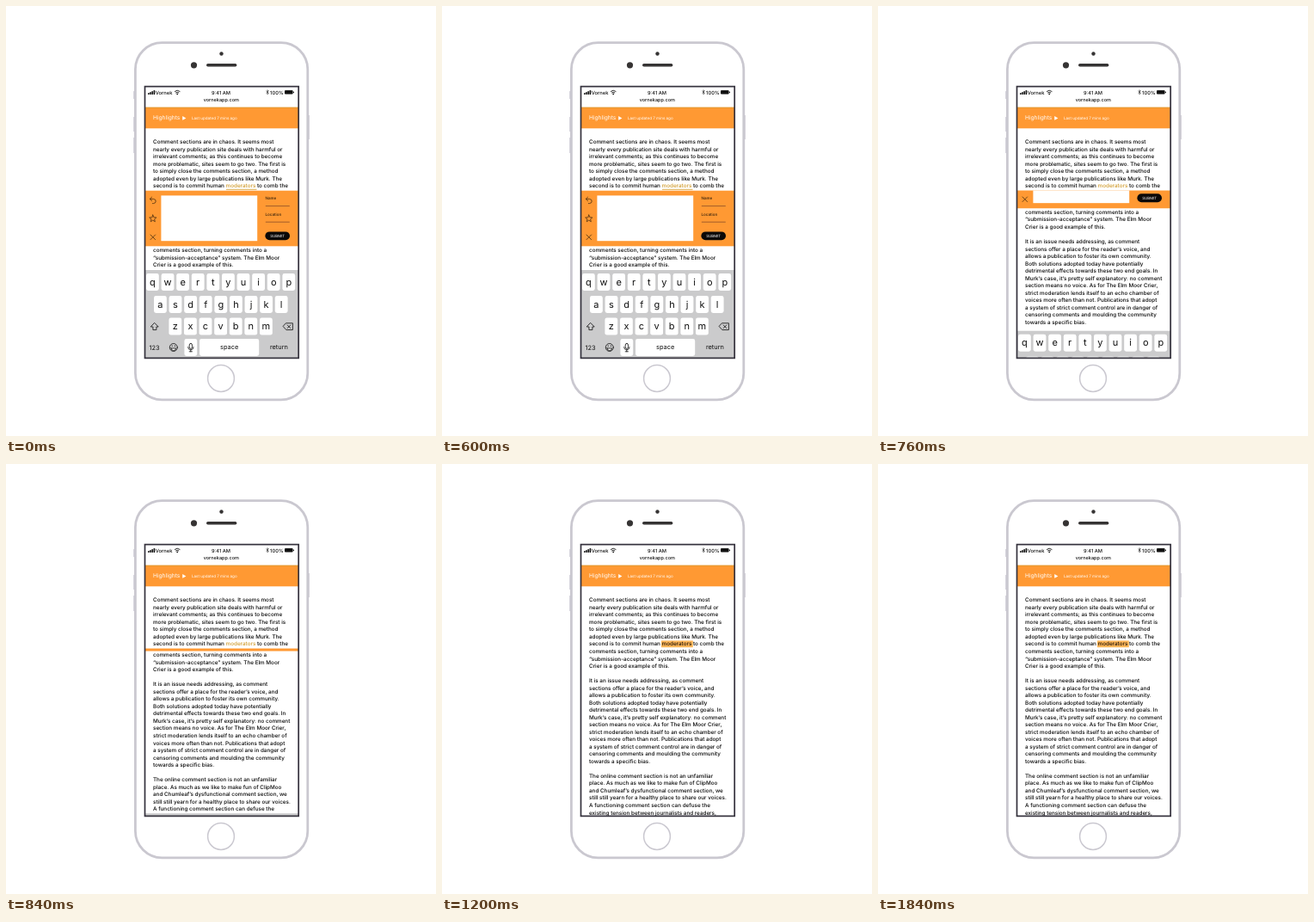
An HTML page that plays this animation: 500 by 500 pixels, repeating every 1880 ms.

```html
<!DOCTYPE html>
<html lang="en">
<head>
<meta charset="utf-8">
<title>Comment panel closing</title>
<style>
  html, body { margin: 0; width: 100%; height: 100%; overflow: hidden; background: #fff; }
  svg { display: block; width: 100vw; height: 100vh; }
  text { font-family: Inter, "Liberation Sans", sans-serif; text-rendering: geometricPrecision; white-space: pre; }
  .line { fill: none; stroke-linecap: round; stroke-linejoin: round; }
  .copy { font-size: 6.32px; font-weight: 500; fill: #080808; }
</style>
</head>
<body>
<svg id="stage" viewBox="0 0 500 500" xmlns="http://www.w3.org/2000/svg">
  <defs>
    <clipPath id="screenClip"><rect x="162" y="94" width="178" height="315"/></clipPath>
    <clipPath id="lowerClip"><rect x="162" y="214.6" width="178" height="194.4"/></clipPath>
  </defs>
  <rect width="500" height="500" fill="#fff"/>

  <!-- phone body -->
  <path d="M148.8 99v9M148.8 129v17M148.8 153v18M352.2 127v28" stroke="#d3d1da" stroke-width="1.4"/>
  <rect x="150.4" y="42.6" width="200.4" height="415.2" rx="31" fill="#fff" stroke="#cac8d0" stroke-width="2.8"/>
  <g fill="#363434">
    <circle cx="218.5" cy="68.8" r="3.6"/>
    <circle cx="250.5" cy="55.5" r="2.2"/>
    <rect x="233" y="67.1" width="35.4" height="3.5" rx="1.75"/>
  </g>
  <circle cx="250" cy="433" r="15.4" fill="#fff" stroke="#cac8d0" stroke-width="1.5"/>

  <g clip-path="url(#screenClip)">
    <!-- status bar -->
    <g fill="#111" font-weight="500">
      <g id="signal"></g>
      <text x="173.7" y="102.8" font-size="5.8">Vornek</text>
      <text x="250" y="102.8" font-size="5.7" text-anchor="middle">9:41 AM</text>
      <text x="250.3" y="111.3" font-size="5.5" text-anchor="middle">vornekapp.com</text>
      <text x="307" y="102.8" font-size="5.8">100%</text>
      <rect x="324" y="98" width="9.6" height="4.6" rx="1"/>
      <rect x="334" y="99.4" width="1" height="1.8" rx=".4"/>
      <circle cx="199.2" cy="102.3" r=".9"/>
    </g>
    <g class="line" stroke="#111">
      <path d="M196.3 99.3q2.9-2.5 5.8 0M197.6 100.8q1.6-1.3 3.2 0" stroke-width=".9"/>
      <path d="M302.9 99l2.4 2.4-1.2 1.3v-5l1.2 1.3-2.4 2.4" stroke-width=".6"/>
    </g>

    <!-- header -->
    <rect x="162" y="117.8" width="178" height="24.5" fill="#ff9933"/>
    <path d="M162 118.2h178" stroke="#d9982c" stroke-width=".8"/>
    <g fill="#fff">
      <text x="171" y="132.3" font-size="6.65">Highlights</text>
      <path d="M205.2 128l4.2 2.4-4.2 2.4z"/>
      <text x="216" y="132" font-size="4.56">Last updated 7 mins ago</text>
    </g>

    <rect id="highlight" x="255" y="205.4" width="36.8" height="7.8" fill="#ffb759"/>
    <g id="upperText" class="copy"></g>
    <path id="underline" d="M256 213.3h35.5" stroke="#dba53c" stroke-width=".9"/>

    <g clip-path="url(#lowerClip)">
      <g id="lowerText" class="copy"></g>
      <g id="panel">
        <rect x="162" y="214.4" width="178" height="64.9" fill="#ff9933"/>
        <rect x="180.4" y="220.4" width="111.8" height="52.8" fill="#fff"/>
        <g class="line" stroke="#553512" stroke-width=".85">
          <path d="M169.6 222.2l-2.4 2.2 2.4 2.2M167.4 224.4h4q2.8.2 2.8 2.6t-2.8 2.6h-1"/>
          <path id="star"/>
          <path d="M168 266l5.6 5.6M173.6 266l-5.6 5.6"/>
        </g>
        <g font-size="4.55" font-weight="500" fill="#33210c">
          <text x="301.5" y="224.8">Name</text>
          <text x="301.5" y="243.8">Location</text>
        </g>
        <path d="M301.8 232.6h28M301.8 251.2h28" stroke="#8a4f27" stroke-width=".8"/>
        <rect x="301.4" y="262.4" width="28.6" height="9.8" rx="4.9" fill="#0b0908"/>
        <text x="315.7" y="268.9" font-size="4.4" fill="#fff" text-anchor="middle">SUBMIT</text>
      </g>
    </g>

    <g id="keyboard">
      <rect x="162" y="307" width="178" height="103" fill="#cbcbcc"/>
      <g id="keys" fill="#fff"></g>
      <g id="letters" font-size="11" fill="#111" text-anchor="middle"></g>
      <g font-size="7.4" fill="#111" text-anchor="middle">
        <text x="172.6" y="399.8">123</text>
        <text x="259.7" y="399.4">space</text>
        <text x="317.4" y="399.4">return</text>
      </g>
      <g class="line" stroke="#222" stroke-width=".9">
        <path d="M172.9 368.6l4.3 4.4h-2.3v3.6h-4v-3.6h-2.3z"/>
        <path d="M325.8 368.8h7.6v7.8h-7.6l-3.4-3.9zM327.2 371l3.6 3.6M330.8 371l-3.6 3.6"/>
        <circle cx="194.8" cy="397" r="4.5"/>
        <path d="M192 398h5.6q-.5 2.8-2.8 2.8t-2.8-2.8z" fill="#fff"/>
        <path d="M193.2 395v.6M196.4 395v.6"/>
        <rect x="213.2" y="392.4" width="3.2" height="6" rx="1.6" fill="#fff"/>
        <path d="M211.6 396.6q0 3.2 3.2 3.2t3.2-3.2M214.8 399.8v2M213.2 401.8h3.2"/>
      </g>
    </g>
  </g>
  <rect x="161.5" y="93.6" width="178.7" height="315.8" fill="none" stroke="#34313c" stroke-width="1.7"/>
</svg>

<script>
const LOOP = 1880, STEP = 40;
const CLOSE_START = 656, CLOSE_TIME = 267;
const PANEL_TRAVEL = 66, KEYBOARD_TRAVEL = 106;
const LINE = 8.525, FIRST_BASELINE = 160.3;

const upperLines = `Comment sections are in chaos. It seems most
nearly every publication site deals with harmful or
irrelevant comments; as this continues to become
more problematic, sites seem to go two. The first is
to simply close the comments section, a method
adopted even by large publications like Murk. The
second is to commit human *moderators* to comb the`.split("\n");

const lowerLines = `comments section, turning comments into a
“submission-acceptance” system. The Elm Moor
Crier is a good example of this.

It is an issue needs addressing, as comment
sections offer a place for the reader’s voice, and
allows a publication to foster its own community.
Both solutions adopted today have potentially
detrimental effects towards these two end goals. In
Murk’s case, it’s pretty self explanatory: no comment
section means no voice. As for The Elm Moor Crier,
strict moderation lends itself to an echo chamber of
voices more often than not. Publications that adopt
a system of strict comment control are in danger of
censoring comments and moulding the community
towards a specific bias.

The online comment section is not an unfamiliar
place. As much as we like to make fun of ClipMoo
and Chumleaf’s dysfunctional comment section, we
still still yearn for a healthy place to share our voices.
A functioning comment section can defuse the
existing tension between journalists and readers,`.split("\n");

const $ = id => document.getElementById(id);

function add(parent, tag, attrs, content = "") {
  const el = document.createElementNS("http://www.w3.org/2000/svg", tag);
  for (const name in attrs) el.setAttribute(name, attrs[name]);
  el.textContent = content;
  return parent.appendChild(el);
}

let keyword;
function addLines(parent, lines, offset) {
  lines.forEach((line, i) => {
    const text = add(parent, "text", { x: 171, y: FIRST_BASELINE + (i + offset) * LINE });
    line.split("*").forEach((part, j) => {
      const span = add(text, "tspan", {}, part);
      if (j === 1) keyword = span;
    });
  });
}
addLines($("upperText"), upperLines, 0);
addLines($("lowerText"), lowerLines, upperLines.length);

for (let i = 0; i < 4; i++) {
  const height = 2 + i;
  add($("signal"), "rect", { x: 165 + i * 2.2, y: 103 - height, width: 1.6, height, rx: .4 });
}

const addKey = (x, y, width) => add($("keys"), "rect", { x, y, width, height: 20, rx: 2.4 });
[["qwertyuiop", 170.4, 311], ["asdfghjkl", 179.4, 337], ["zxcvbnm", 196.8, 362.6]].forEach(([row, x, y]) =>
  [...row].forEach((letter, i) => {
    const center = x + i * 17.6;
    addKey(center - 7.4, y, 14.8);
    add($("letters"), "text", { x: center, y: y + 13.6 }, letter);
  }));
addKey(207.4, 387, 14.8);
addKey(225, 387, 69.2);

const starPoints = Array.from({ length: 10 }, (_, i) => {
  const radius = i % 2 ? 1.9 : 4.3, angle = (i / 5 - .5) * Math.PI;
  return [170.8 + radius * Math.cos(angle), 247.3 + radius * Math.sin(angle)].map(v => v.toFixed(2));
});
$("star").setAttribute("d", "M" + starPoints.join("L") + "z");

// cubic-bezier(.25, .1, .25, 1), solved for x by bisection
function ease(x) {
  if (x <= 0) return 0;
  if (x >= 1) return 1;
  let low = 0, high = 1, s = .5;
  for (let i = 0; i < 24; i++) {
    s = (low + high) / 2;
    if (.75 * s * (1 - s) + s ** 3 < x) low = s; else high = s;
  }
  return .3 * s * (1 - s) ** 2 + 3 * s * s * (1 - s) + s ** 3;
}

const shiftY = (id, y) => $(id).setAttribute("transform", `translate(0 ${y.toFixed(3)})`);
const show = (id, visible) => $(id).setAttribute("visibility", visible ? "visible" : "hidden");

function render(time) {
  const closed = ease((time - CLOSE_START) / CLOSE_TIME);
  shiftY("lowerText", PANEL_TRAVEL * (1 - closed));
  shiftY("panel", -PANEL_TRAVEL * closed);
  shiftY("keyboard", KEYBOARD_TRAVEL * closed);
  show("panel", closed < 1);
  show("keyboard", closed < 1);
  show("underline", closed === 0);
  show("highlight", closed === 1);
  keyword.setAttribute("fill", closed < 1 ? "#cf9a2b" : "#1c1206");
}

const start = performance.now();
function tick() {
  const time = (performance.now() - start) % LOOP;
  render(Math.floor(time / STEP) * STEP);
  requestAnimationFrame(tick);
}
tick();
</script>
</body>
</html>
```
